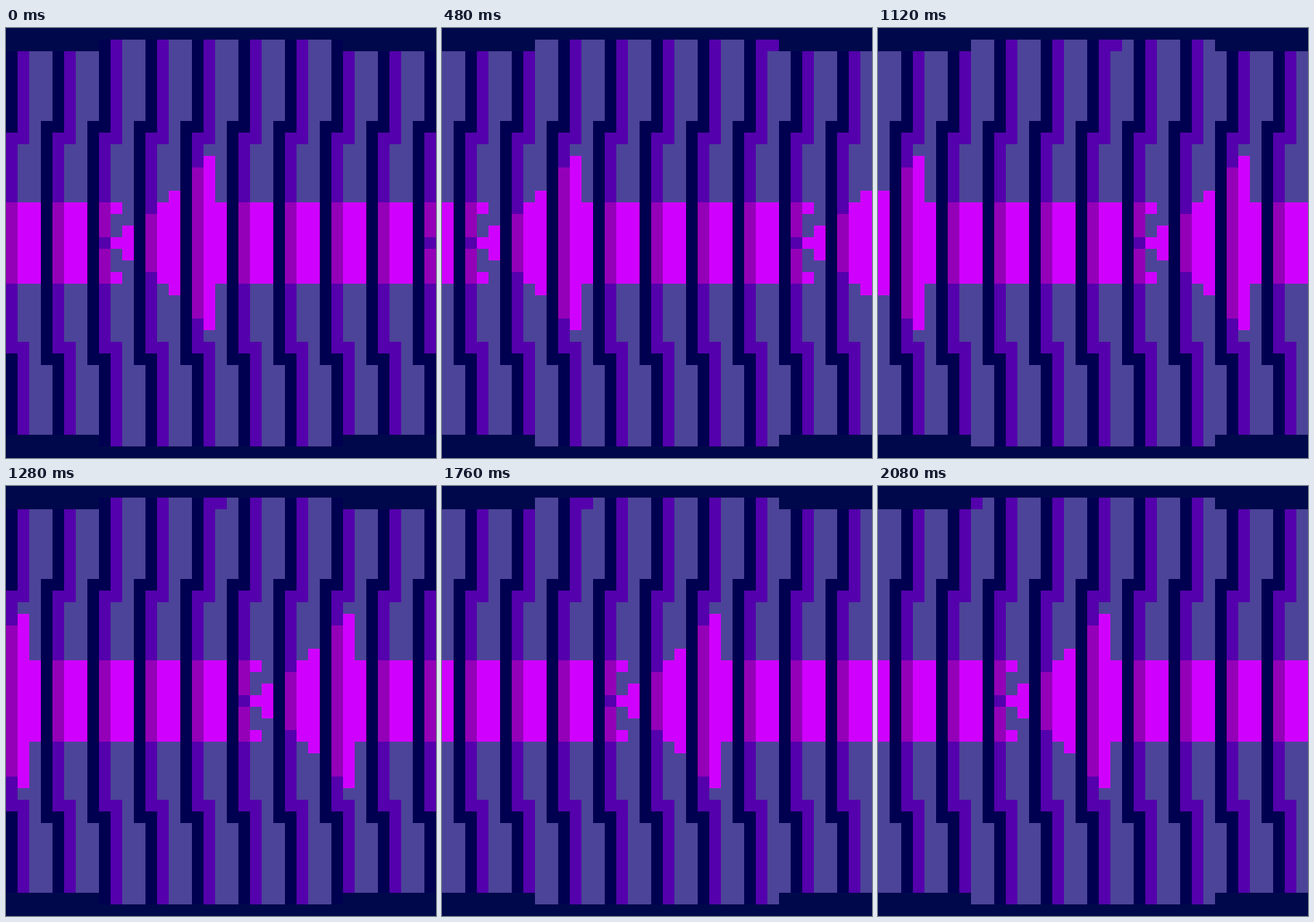
Write an HTML page with a canvas that moves like this. It is 592 px wide and 592 px high and loops after 2.24 s.

```html
<!DOCTYPE html>
<html lang="en">
<head>
<meta charset="utf-8">
<title>Pixel stripes</title>
<style>
  html, body { margin: 0; width: 100%; height: 100%; overflow: hidden; background: #00084c; }
  canvas { display: block; width: 592px; height: 592px; }
</style>
</head>
<body>
<canvas id="stage" width="592" height="592"></canvas>
<script>
const CELL = 16, GRID = 37, MID = 18;
const STEP = 160, STEPS = 14, PERIOD = 28;
const BACK = '#00084c', NAVY = '#000050', PURPLE = '#5400ac', SLATE = '#4c4498';
const PLUM = '#9400b8', PINK = '#d000ff';
const ctx = document.getElementById('stage').getContext('2d');

const mod = (a, n) => ((a % n) + n) % n;

// Stripe colours by distance from the middle row
function stripes(d) {
  if (d < 9) return [PURPLE, SLATE, SLATE, NAVY];
  if (d === 9) return [PURPLE, PURPLE, SLATE, NAVY];
  if (d === 10) return [NAVY, PURPLE, SLATE, NAVY];
  return [NAVY, PURPLE, SLATE, SLATE];
}

// Lit range [nearest, farthest] of each stripe cell; the first three bars differ
const BARS = [
  [[1, 3], [0, 3], [0, 1]],
  [[0, 2], [0, 3], [0, 4]],
  [[0, 6], [0, 7], [0, 3]]
];
const PLAIN = [[0, 3], [0, 3], [0, 3]];

function isLit(u, d) {
  const c = u % 4;
  if (c === 3) return false;
  if (u === 1) return d === 0 || d === 3;
  const [near, far] = (BARS[u >> 2] || PLAIN)[c];
  return d >= near && d <= far;
}

function colour(x, y, step) {
  const d = Math.abs(y - MID);
  if (d > 17 || (d === 17 && (x < 8 || x > 28))) return BACK;
  const u = mod(x - 8 + 2 * step, PERIOD);
  if (isLit(u, d)) return u % 4 === 0 ? PLUM : PINK;
  if (y === 1 && u === 26) return PURPLE;
  return stripes(d)[u % 4];
}

function draw(step) {
  for (let y = 0; y < GRID; y++) {
    for (let x = 0; x < GRID; x++) {
      ctx.fillStyle = colour(x, y, step);
      ctx.fillRect(x * CELL, y * CELL, CELL, CELL);
    }
  }
}

let start = null, shown = 0;
draw(0);
function tick(now) {
  if (start === null) start = now;
  const step = Math.floor((now - start) / STEP) % STEPS;
  if (step !== shown) draw(shown = step);
  requestAnimationFrame(tick);
}
requestAnimationFrame(tick);
</script>
</body>
</html>
```
